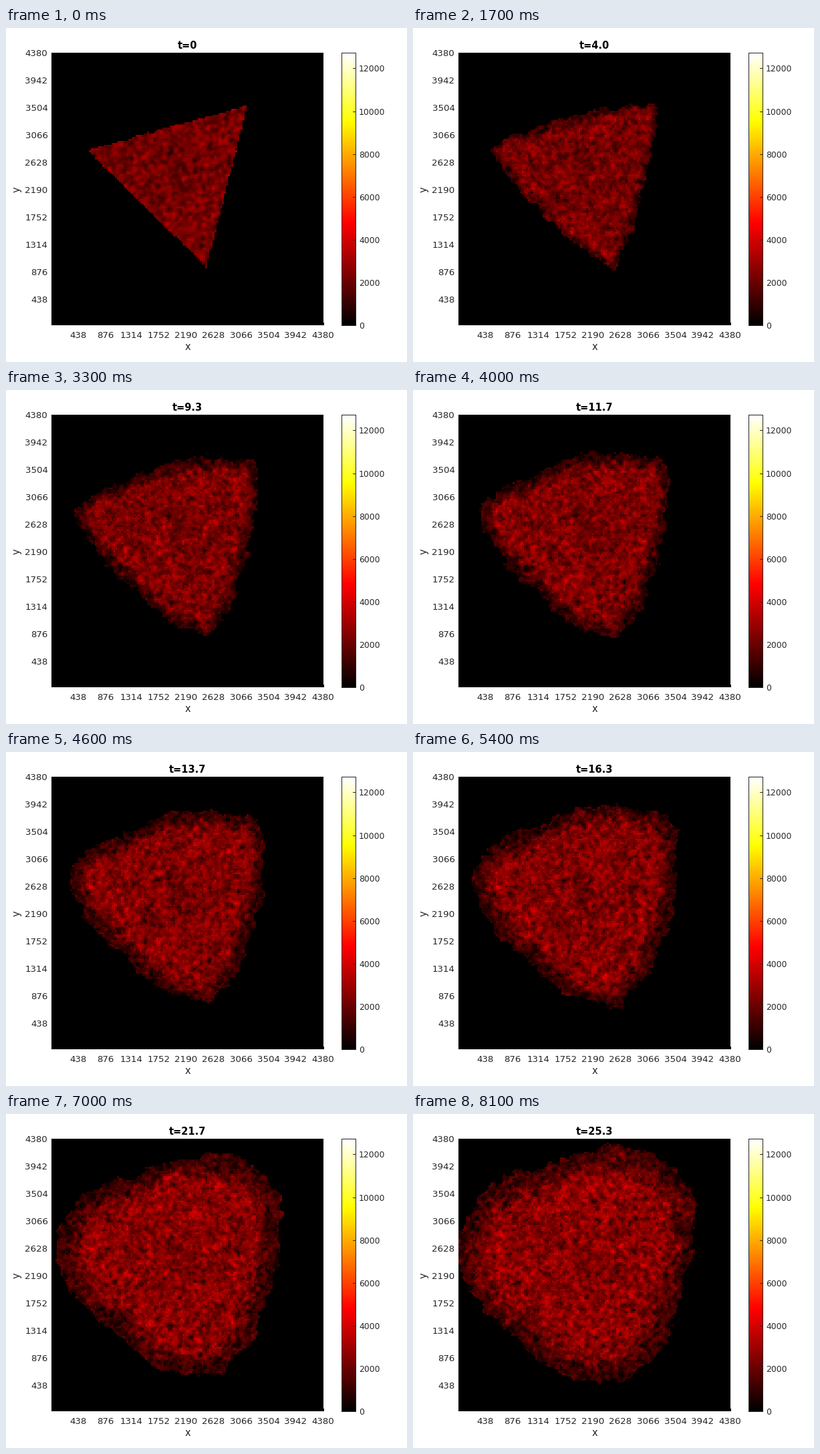
These frames come from a looping animation (600x500 px, 8200 ms). A matplotlib script:

```python
import numpy as np
import matplotlib.pyplot as plt
from matplotlib.animation import FuncAnimation
from matplotlib.colors import ListedColormap
from matplotlib.patches import Rectangle

W, H, DPI = 600, 500, 100
FRAMES, HOLD, T_END = 82, 5, 76 / 3
N = 145                                # cells per side
LEFT, TOP, WIDE, HIGH = 68, 37, 407, 407
VMAX = 12700
GREY = "#262626"
CENTER = np.array([255, 225])
CORNERS = np.array([(122, 183), (361, 116), (300, 358)])

rng = np.random.default_rng(7)
X, Y = np.meshgrid(LEFT + (np.arange(N) + 0.5) * WIDE / N,
                   TOP + (np.arange(N) + 0.5) * HIGH / N)
RADIUS = np.hypot(X - CENTER[0], Y - CENTER[1])
ANGLE = np.arctan2(Y - CENTER[1], X - CENTER[0])


def triangle_reach():
    """Distance from the center to the triangle's side in each direction."""
    best = np.full((N, N), np.inf)
    for a, b in zip(CORNERS, np.roll(CORNERS, -1, axis=0)):
        normal = np.array([b[1] - a[1], a[0] - b[0]]) / np.hypot(*(b - a))
        facing = normal[0] * np.cos(ANGLE) + normal[1] * np.sin(ANGLE)
        best = np.minimum(best, (a - CENTER) @ normal / np.maximum(facing, 1e-6))
    return best


def rounded_reach():
    """The swollen three-lobed outline reached at the end."""
    return (172 + 18 * np.cos(3 * (ANGLE - np.radians(72)))
            + 7 * np.cos(ANGLE - np.radians(275)))


def noise(passes):
    a = rng.standard_normal((N, N))
    for _ in range(passes):
        for axis in (0, 1):
            a = (np.roll(a, 1, axis) + 2 * a + np.roll(a, -1, axis)) / 4
    return a / a.std()


def drift(fields, pos):
    """Blend from one random field to the next, keeping the variance."""
    i = int(pos)
    w = (pos - i) * np.pi / 2
    return np.cos(w) * fields[i] + np.sin(w) * fields[i + 1]


FIRST, LAST = triangle_reach(), rounded_reach()
FIXED, GRAIN, LOBES = noise(1), noise(1), noise(24)
BLOBS = [noise(1) for _ in range(11)]
FINE = [noise(0) for _ in range(22)]
EDGE = [noise(4) for _ in range(6)]
CORE = 1 - 0.13 * np.exp(-((X - 264) ** 2 + (Y - 225) ** 2) / (2 * 38 ** 2))


def density(t):
    aged = min(1, t / 5)
    rim = FIRST + (LAST - FIRST) * (t / T_END) ** 0.9
    rough = ((0.5 + 1.6 * aged) * drift(EDGE, t / 6)
             + (0.7 + 0.8 * aged) * GRAIN + 2.5 * aged * LOBES)
    depth = rim + rough - RADIUS
    s = np.clip((depth - 4) / (6 + 1.7 * t), 0, 1)
    s = s * s * (3 - 2 * s)
    fade = 1 - 0.6 * aged * (1 - s)
    speckle = (0.14 * FIXED + 0.14 * drift(BLOBS, t / 2.6)
               + (0.04 + 0.07 * aged) * drift(FINE, t / 1.25))
    value = (2250 + 16 * t) * CORE * fade * (1 + speckle * (1 + 0.8 * aged * (1 - s)))
    return np.where(depth > 0, np.maximum(value, 250), 0)


level = np.arange(256)
hot = ListedColormap(np.clip(np.c_[level / 96, (level - 96) / 96, (level - 191) / 64], 0, 1))

plt.rcParams["font.family"] = "DejaVu Sans"
fig = plt.figure(figsize=(W / DPI, H / DPI), dpi=DPI, facecolor="white")


def label(x, y, s, size, **kw):
    kw = {"ha": "center", "va": "baseline", "color": GREY, **kw}
    return fig.text(x / W, 1 - y / H, s, fontsize=size * 72 / DPI, **kw)


def panel(x, y, w, h):
    ax = fig.add_axes([x / W, 1 - (y + h) / H, w / W, h / H])
    ax.axis("off")
    return ax


def block(x, y, w, h, color):
    fig.add_artist(Rectangle((x / W, 1 - (y + h) / H), w / W, h / H,
                             color=color, lw=0, zorder=-1))


block(LEFT, 443, 408, 2, "black")
block(474, 441, 2, 4, "black")
image = panel(LEFT, TOP, WIDE, HIGH).imshow(
    density(0), cmap=hot, vmin=0, vmax=VMAX, aspect="auto", interpolation="nearest")

block(502, 37, 22, 409, GREY)
panel(503, 38, 20, 407).imshow(
    level[::-1, None], cmap=hot, aspect="auto", interpolation="nearest")
bar = panel(503, 38, 20, 407)
bar.set(xlim=(0, 20), ylim=(0, VMAX))
for v in range(0, VMAX, 2000):
    bar.plot([16, 20], [v, v], color=GREY, lw=0.7)
    label(528, 450 - 407 * v / VMAX, str(v), 12.4, ha="left")

for i in range(1, 11):
    s = f"{438 * i}"
    label(64.5 + 41 * i + 2 * (4 - len(s)), 463.5, s, 13.33)
    label(62.5, 452 - 41 * i, s, 13.33, ha="right")

label(272, 482, "x", 14.67)
label(16.5, 241.5, "y", 14.67, va="center", rotation=90)
title = label(271.5, 31, "t=0", 14.67, color="black", weight="bold")


def update(i):
    t = max(0, i - HOLD) / 3
    image.set_data(density(t))
    title.set_text("t=0" if i < HOLD else f"t={t:.1f}")
    return image, title


anim = FuncAnimation(fig, update, frames=FRAMES, interval=100, repeat=True, repeat_delay=0)
plt.show()
```
